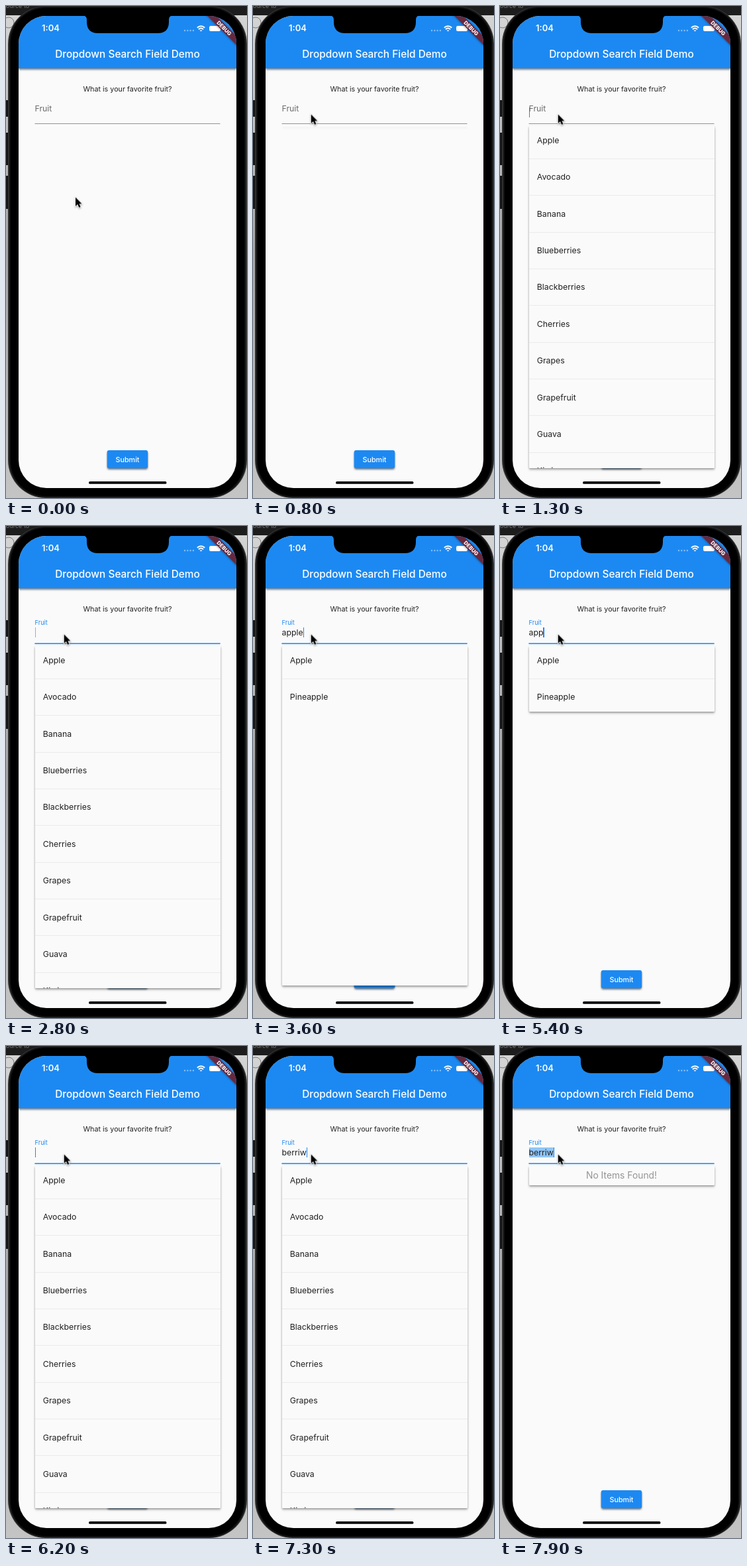
Animation of 364 by 742 pixels, one loop 8 s. Source, as an HTML page:

```html
<!DOCTYPE html>
<html lang="en">
<head>
<meta charset="utf-8">
<title>Dropdown Search Field Demo</title>
<style>
  :root { --blue: #1c89f2; --loop: 8s linear infinite; }
  html, body { margin: 0; width: 100%; height: 100%; overflow: hidden; background: #b4b4b4; }
  body { position: relative; font-family: Inter, Roboto, sans-serif; }
  body > * { position: absolute; left: 0; top: 0; }
  svg { width: 364px; height: 742px; }
  .ink { fill: #212121; }

  #label { fill: #6c6c6c; animation: float var(--loop); }
  @keyframes float {
    0%, 16.4% { transform: translate(43.5px, 158.5px); fill: #6c6c6c; animation-timing-function: ease-out; }
    18.75%, 100% { transform: translate(43.5px, 149px) scale(.75); fill: var(--blue); }
  }
  #underline { fill: var(--blue); opacity: 0; animation: focus var(--loop); }
  @keyframes focus {
    0%, 16.4% { opacity: 0; }
    18.75%, 100% { opacity: 1; }
  }

  #field { left: 43.5px; top: 152.5px; font-size: 12.3px; line-height: 16px; white-space: pre; color: #212121; }
  #caret { display: inline-block; width: 1.5px; height: 15px; margin-top: .5px; vertical-align: top; background: var(--blue); }
  .selected { background: #90c5f7; }

  #menu {
    left: 43.5px; top: 181px; width: 280px; overflow: hidden; background: #fafafa; border-radius: 1px;
    box-shadow: 0 1.5px 3px rgba(0,0,0,.34), 0 3px 4px rgba(0,0,0,.12);
    animation: resize var(--loop);
  }
  @keyframes resize {
    0%, 10% { height: 0; opacity: 0; animation-timing-function: ease-out; }
    10.1% { height: 4px; opacity: 1; animation-timing-function: ease-out; }
    15%, 45% { height: 516px; opacity: 1; animation-timing-function: ease-out; }
    47%, 73.75% { height: 98.5px; animation-timing-function: ease-out; }
    76.25%, 93.75% { height: 516px; animation-timing-function: ease-out; }
    95%, 100% { height: 28.6px; opacity: 1; }
  }
  .row { position: relative; height: 43.07px; padding-left: 12.3px; font-size: 12.3px; line-height: 43.07px; color: #212121; }
  .row + .row { margin-top: 12.3px; }
  .row + .row::before { content: ""; position: absolute; left: 0; top: -6.5px; width: 100%; height: 1px; background: #ebebeb; }
  .none { text-align: center; font-size: 13.85px; line-height: 28.6px; color: #959595; }

  #pointer { animation: point var(--loop); filter: drop-shadow(0 1px 1px rgba(0,0,0,.35)); }
  @keyframes point {
    0%, 1% { transform: translate(105px, 288.5px); }
    2.5%, 5% { transform: translate(109px, 264px); animation-timing-function: ease-in-out; }
    9.5%, 100% { transform: translate(87.7px, 163.5px); }
  }
</style>
</head>
<body>
<svg viewBox="0 0 364 742">
  <defs>
    <clipPath id="screen"><rect x="19" y="15" width="329" height="712" rx="42"/></clipPath>
    <linearGradient id="desk" x2="0" y2="1">
      <stop offset="0" stop-color="#d6d6d6"/>
      <stop offset=".5" stop-color="#a6a6a6"/>
      <stop offset="1" stop-color="#c4c4c4"/>
    </linearGradient>
    <filter id="soft" x="-20%" y="-40%" width="140%" height="200%"><feGaussianBlur stdDeviation="1.6"/></filter>
  </defs>

  <rect width="364" height="742" fill="url(#desk)"/>
  <rect width="364" height="14" fill="#1d1d1d"/>
  <text x="0" y="3" font-size="9" fill="#777">ource to</text>
  <circle cx="4" cy="25" r="8" fill="none" stroke="#777"/>

  <g fill="#161616">
    <rect y="142" width="8" height="25"/>
    <rect y="191" width="8" height="49"/>
    <rect y="256" width="8" height="50"/>
  </g>
  <rect x="3" width="361" height="742" rx="57" fill="#303030"/>
  <rect x="5" y="1" width="357" height="740" rx="55" fill="#111"/>
  <rect x="7" y="3" width="353" height="736" rx="53"/>

  <g clip-path="url(#screen)">
    <rect x="19" y="15" width="329" height="712" fill="#fafafa"/>
    <rect x="19" y="20" width="329" height="76" opacity=".5" filter="url(#soft)"/>
    <rect x="19" y="15" width="329" height="79" fill="#1c89f2"/>
    <path d="M116 14q6 1 6 7v3q0 17 17 17h90q17 0 17-17v-3q0-6 6-7z"/>
    <g fill="#fff">
      <text x="54" y="38.3" font-size="13" font-weight="600">1:04</text>
      <g opacity=".45">
        <circle cx="270" cy="37" r="1.2"/><circle cx="274.3" cy="37" r="1.2"/>
        <circle cx="278.6" cy="37" r="1.2"/><circle cx="282.9" cy="37" r="1.2"/>
      </g>
      <rect x="307" y="30" width="17" height="8" rx="2.3"/>
    </g>
    <g fill="none" stroke="#fff" stroke-width="1.9">
      <path d="M288.8 32.8q5.7-5 11.4 0M290.9 35.2q3.6-3.2 7.2 0"/>
      <path d="M293.3 36.9h2.4l-1.2 1.2z" stroke-width="1"/>
    </g>
    <g transform="translate(348 15) rotate(45)">
      <rect x="-42" y="21.5" width="84" height="10" opacity=".4" filter="url(#soft)"/>
      <rect x="-42" y="21.5" width="84" height="9.3" fill="#68283e"/>
      <text y="29" font-size="7.9" font-weight="800" fill="#fff" text-anchor="middle">DEBUG</text>
    </g>
    <text x="183.5" y="78.2" font-size="15.4" font-weight="500" fill="#fff" text-anchor="middle">Dropdown Search Field Demo</text>
  </g>

  <text class="ink" x="183.5" y="129" font-size="10.77" text-anchor="middle">What is your favorite fruit?</text>
  <text id="label" font-size="12.3">Fruit</text>
  <rect x="43.5" y="177" width="280" height="1" fill="#929292"/>
  <rect id="underline" x="43.5" y="176.5" width="280" height="1.6"/>

  <rect x="153" y="672" width="61" height="27" rx="3" opacity=".55" filter="url(#soft)"/>
  <rect x="152.7" y="670" width="61.5" height="27.3" rx="3" fill="#1c89f2"/>
  <text x="183.5" y="688" font-size="10.77" font-weight="500" fill="#fff" text-anchor="middle">Submit</text>
  <rect x="125" y="717" width="117.5" height="3.8" rx="1.9"/>
</svg>

<div id="field"><span id="typed"></span><span id="caret"></span></div>
<div id="menu"></div>

<svg viewBox="0 0 364 742">
  <path id="pointer" d="M0 0V13.4L3.1 10.6 5.3 15.6 7.7 14.5 5.6 9.7H9.6Z" stroke="#fff" stroke-width="1.6" paint-order="stroke"/>
</svg>

<script>
const LOOP = 8000, FOCUS = 1200, SELECT = 7700;
const fruits = ["Apple", "Avocado", "Banana", "Blueberries", "Blackberries", "Cherries",
  "Grapes", "Grapefruit", "Guava", "Kiwi", "Pineapple"];

// [time, field text]
const edits = [[0, ""], [FOCUS, ""],
  [2900, "a"], [3050, "ap"], [3170, "app"], [3300, "appl"], [3400, "apple"],
  [5150, "appl"], [5300, "app"], [5480, "ap"], [5590, "a"], [5700, ""],
  [6450, "b"], [6600, "be"], [6750, "ber"], [6870, "berr"], [7000, "berri"], [7150, "berriw"],
  [SELECT, "berriw"]];
// [time, search applied to the menu]
const searches = [[0, ""], [3600, "apple"], [5900, ""], [7500, "berriw"]];

const typed = document.getElementById("typed");
const caret = document.getElementById("caret");
const menu = document.getElementById("menu");
const clamp = v => Math.min(1, Math.max(0, v));
const latest = (list, t) => list.findLast(([at]) => at <= t);

function caretOpacity(t, since) {
  if (t < FOCUS) return 0;
  const phase = (t - since) % 1000;
  return phase < 780 ? 1 - clamp((phase - 500) / 250) : clamp((phase - 780) / 100);
}

let shown = null;
function showMenu(query) {
  if (query === shown) return;
  shown = query;
  const rows = fruits.filter(name => name.toLowerCase().includes(query));
  menu.innerHTML = rows.map(name => `<div class="row">${name}</div>`).join("")
    || '<div class="none">No Items Found!</div>';
}

let start;
function draw(now) {
  start ??= now;
  const t = (now - start) % LOOP;
  const [since, text] = latest(edits, t);
  typed.textContent = text;
  typed.className = t >= SELECT ? "selected" : "";
  caret.style.opacity = caretOpacity(t, since);
  showMenu(latest(searches, t)[1]);
  requestAnimationFrame(draw);
}
requestAnimationFrame(draw);
</script>
</body>
</html>
```
